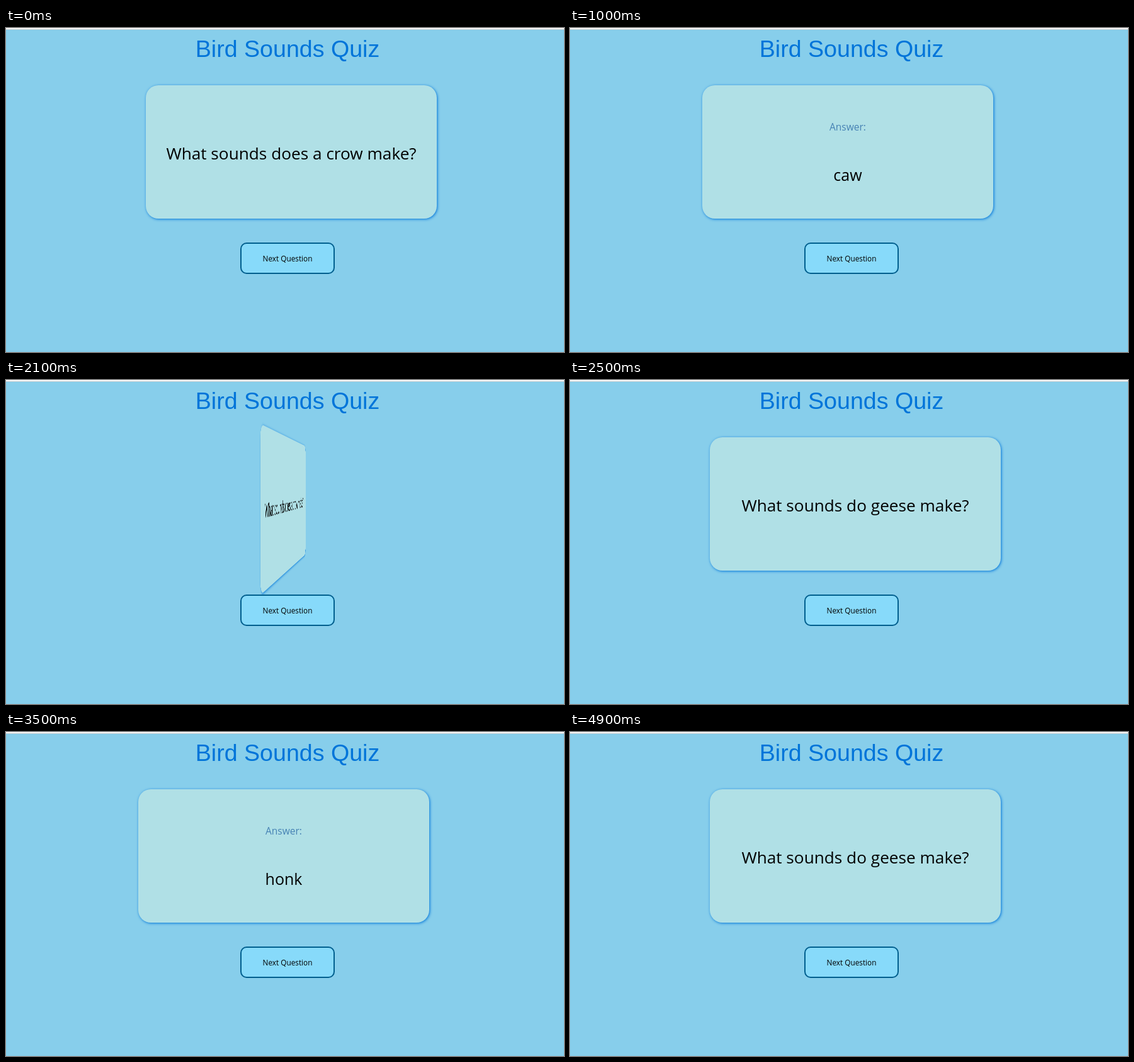
Animation of 886x515 px, one loop 6 s. Source, as an HTML page:

```html
<!DOCTYPE html>
<html lang="en">
<head>
<meta charset="utf-8">
<title>Bird Sounds Quiz</title>
<style>
  html, body { margin: 0; width: 100%; height: 100%; overflow: hidden; }
  body { position: relative; background: #87ceeb; font-family: "Open Sans", "Noto Sans", sans-serif; }
  .bar { position: absolute; top: 0; left: 0; right: 0; height: 2px; background: #f6f6f6; border-bottom: 1px solid #bccbd2; }
  h1 {
    position: absolute; left: 0; top: 0; width: 894px; margin: 0; text-align: center;
    font: 37.6px/66px "Liberation Sans", Arial, sans-serif; color: #0074d9;
  }
  .scene {
    position: absolute; left: 0; top: 0; width: 894px; height: 515px;
    perspective: 1000px; perspective-origin: 447px 166px;
  }
  #card { position: absolute; inset: 0; transform-style: preserve-3d; }
  .face {
    position: absolute; left: 222px; top: 91px; width: 462px; height: 212px;
    border-radius: 20px; background: #b0e0e6; box-shadow: 1px 1px 4px #0074d9;
    backface-visibility: hidden; text-align: center;
  }
  .back { transform: rotateY(180deg); }
  .face p { position: absolute; left: 0; top: 0; width: 100%; margin: 0; white-space: nowrap; }
  #question { font-size: 26.2px; line-height: 216px; }
  .label { font-size: 15.5px; line-height: 132px; font-weight: 500; color: #4682b4; }
  #answer { font-size: 25px; line-height: 284px; font-weight: 500; }
  .button {
    position: absolute; left: 372px; top: 341px; width: 150px; height: 50px; box-sizing: border-box;
    border: 2px solid #005f8e; border-radius: 10px; background: #87dafa;
    font-size: 11.8px; line-height: 46px; text-align: center;
  }
  #caption { display: block; }
</style>
</head>
<body>
<div class="bar"></div>
<h1>Bird Sounds Quiz</h1>
<div class="scene">
  <div id="card">
    <div class="face"><p id="question"></p></div>
    <div class="face back"><p class="label">Answer:</p><p id="answer"></p></div>
  </div>
</div>
<div class="button"><span id="caption">Next Question</span></div>
<script>
const LOOP = 6000, STEP = 100, SWAP = 2500;
const quiz = [
  ["What sounds does a crow make?", "caw"],
  ["What sounds do geese make?", "honk"]
];
// start, duration, direction (1 shows the answer)
const flips = [[588, 410, 1], [1834, 500, -1], [3080, 410, 1], [4390, 500, -1]];
const $ = id => document.getElementById(id);

function ease(u) {
  u = Math.min(1, Math.max(0, u));
  return u * u * (3 - 2 * u);
}

function draw(now) {
  const t = Math.floor(now % LOOP / STEP) * STEP;
  const turn = flips.reduce((sum, [start, time, dir]) => sum + dir * ease((t - start) / time), 0);
  const [question, answer] = quiz[t < SWAP ? 0 : 1];
  $("question").textContent = question;
  $("answer").textContent = answer;
  $("card").style.transform = `rotateY(${turn * 180}deg)`;
  const pressed = t >= SWAP - STEP && t < SWAP;
  $("caption").style.transform = pressed ? "translate(1px, 1px)" : "none";
}

function tick() {
  draw(performance.now());
  requestAnimationFrame(tick);
}
tick();
</script>
</body>
</html>
```
